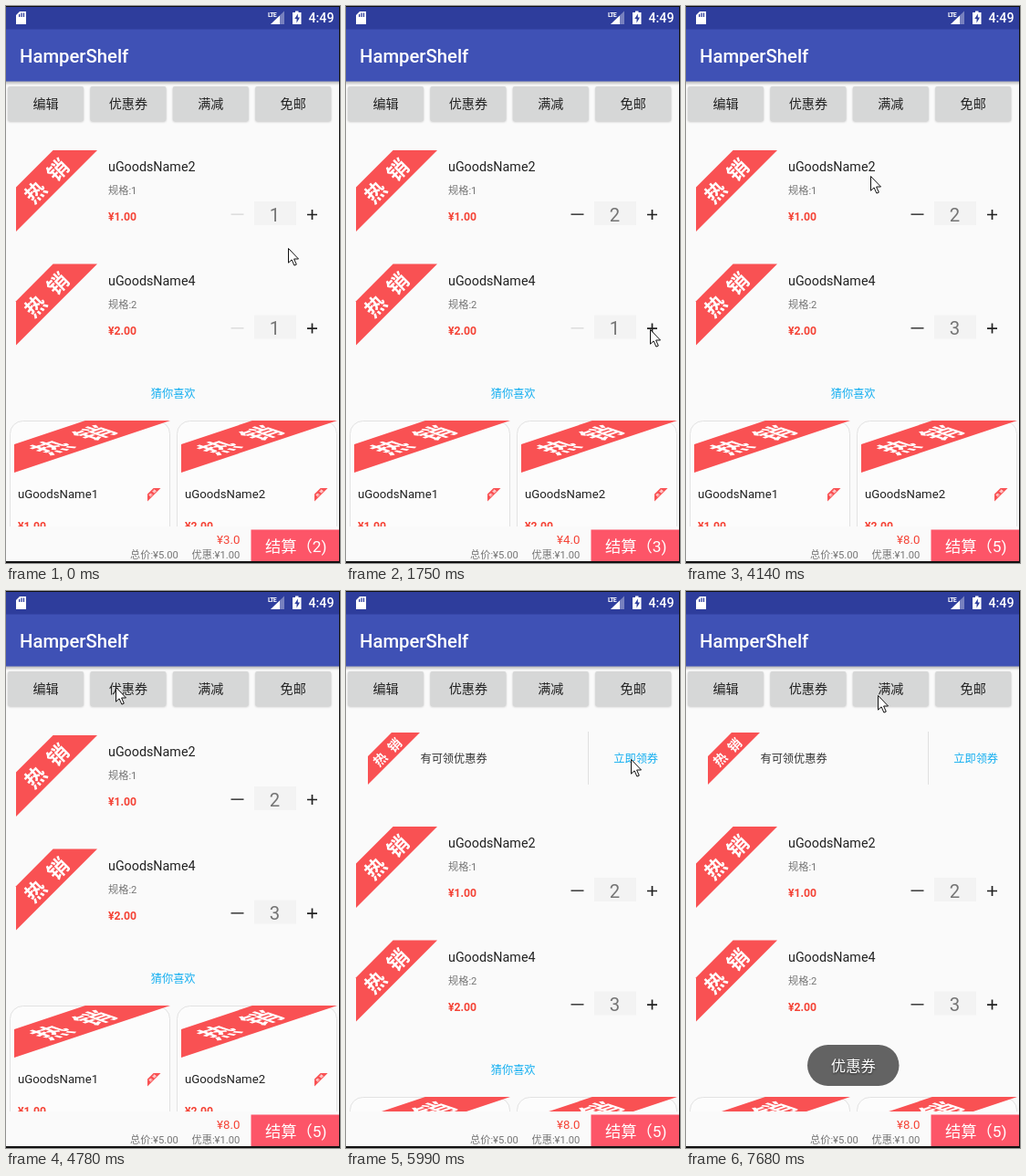
These frames come from a looping animation (366x610 px, 8000 ms). An HTML page:

```html
<!DOCTYPE html>
<html lang="zh-CN">
<head>
<meta charset="utf-8">
<style>
html, body { margin: 0; width: 100%; height: 100%; overflow: hidden; background: #fafafa; }
svg { display: block; }
text { font-family: Roboto, "Noto Sans CJK SC", "Noto Sans CJK", sans-serif; white-space: pre; }
.mid { text-anchor: middle; }
.end { text-anchor: end; }
.name { font-size: 14.3px; fill: #222; }
.small { font-size: 11.2px; fill: #757575; }
.price { font-size: 12.2px; font-weight: 700; fill: #f44336; }
.note { font-size: 12.2px; fill: #333; }
.link { font-size: 12.2px; fill: #13aef0; }
.qty { font-size: 20.3px; fill: #757575; }
</style>
</head>
<body>
<svg id="stage" width="366" height="610" viewBox="0 0 366 610"></svg>
<script>
const LOOP = 8000;
const STEP = 125; // screen refresh, ms
const COUPON_AT = 5200;

// Pointer moves: first step, last step, destination
const home = [309, 265];
const moves = [
  [150, 270, 329, 263],
  [420, 700, 334, 231],
  [1090, 1750, 333, 354],
  [4020, 4140, 202, 186],
  [4290, 4540, 63, 112],
  [4660, 4780, 120, 105],
  [5630, 5990, 312, 184],
  [6390, 6630, 304, 221],
  [6780, 7140, 169, 139],
  [7290, 7410, 145, 113],
  [7560, 7680, 210, 114]
];

// Eased progress that advances in equal visible steps
function progress(t, from, to) {
  if (t < from) return 0;
  const steps = Math.round((to - from) / STEP) + 1;
  const done = Math.floor((t - from) / (to - from) * (steps - 1)) + 1;
  return Math.sin(Math.min(1, done / steps) * Math.PI / 2);
}

function pointerAt(t) {
  let [x, y] = home;
  for (const [from, to, toX, toY] of moves) {
    const p = progress(t, from, to);
    x += (toX - x) * p;
    y += (toY - y) * p;
  }
  return `${x} ${y}`;
}

const text = (cls, x, y, str, extra = "") =>
  `<text class="${cls}" x="${x}" y="${y}" ${extra}>${str}</text>`;
const tag = (x, y, w, h = w) =>
  `<use href="#tag" transform="translate(${x} ${y}) scale(${w / 90} ${h / 90})"/>`;

const button = (label, i) => {
  const x = 2 + i * 90.4;
  return `<rect x="${x}" y="89" width="83" height="38" rx="2" fill="#000" opacity=".2" filter="url(#soft)"/>
    <rect id="button${i}" x="${x}" y="88" width="83" height="38" rx="2" fill="#d6d7d7"/>` +
    text("mid", x + 41.5, 112.3, label, 'font-size="14.1" fill="#222"');
};

const item = (y, n, spec, price, id) => `<g transform="translate(0 ${y})">
  ${tag(11, 0, 89)}
  ${text("name", 112, 23, "uGoodsName" + n)}
  ${text("small", 112, 48, "规格:" + spec)}
  ${text("price", 112, 77, price)}
  <path id="minus${id}" d="M246.5 70.2h14" stroke-width="1.6"/>
  <rect x="272" y="56" width="46" height="26" fill="#f3f3f3"/>
  ${text("qty mid", 294.5, 77.5, "1", `id="qty${id}"`)}
  <path d="M330 70.5h11M335.5 65v11" stroke="#222" stroke-width="1.7"/>
</g>`;

const card = (x, n) => `<g transform="translate(${x} 454)">
  <rect x="4.5" y=".5" width="175" height="170" rx="14" fill="#fcfcfc" stroke="#e2e2e2"/>
  ${tag(9, 0, 171, 57)}
  ${text("name", 13, 85, "uGoodsName" + n, 'style="font-size:13.2px"')}
  ${tag(155, 74, 14.5)}
  ${text("price", 13, 119.5, `¥${n}.00`)}
</g>`;

stage.innerHTML = `<defs>
  <filter id="soft" x="-10%" y="-20%" width="120%" height="140%"><feGaussianBlur stdDeviation="1"/></filter>
  <linearGradient id="shade" x2="0" y2="1">
    <stop stop-opacity=".3"/><stop offset="1" stop-opacity="0"/>
  </linearGradient>
  <g id="tag">
    <path d="M41 0H90L0 90V41z" fill="#f95153"/>
    <text class="mid" transform="translate(34 34) rotate(-45)" x="-17.5 17.5" y="8.5"
      font-size="23" font-weight="700" fill="#fff">热销</text>
  </g>
</defs>
<rect width="366" height="610" fill="#fafafa"/>
<g id="coupon">
  ${tag(24, 155, 57)}
  ${text("note", 81.5, 187.6, "有可领优惠券")}
  <path d="M265.5 154v58" stroke="#e0e0e0"/>
  ${text("link mid", 317.7, 187.6, "立即领券")}
</g>
<g id="list">
  ${item(158, 2, 1, "¥1.00", "A")}
  ${item(282.6, 4, 2, "¥2.00", "B")}
  ${text("link mid", 183.2, 428.7, "猜你喜欢")}
  ${card(0, 1)}${card(183, 2)}
</g>
<rect y="82" width="366" height="5" fill="url(#shade)"/>
${["编辑", "优惠券", "满减", "免邮"].map(button).join("")}

<rect y="25" width="366" height="57.5" fill="#3f51b5"/>
<rect width="366" height="25.5" fill="#2e3d9c"/>
${text("", 15, 62, "HamperShelf", 'font-size="20.3" font-weight="500" fill="#fff"')}
<g fill="#fff">
  <path d="M15 6h7v14H11V10zM14 9v3h1.3V9zm2.4-1.5V12h1.3V7.5zm2.4 0V12h1.3V7.5z" fill-rule="evenodd"/>
  ${text("", 287, 12, "LTE", 'font-size="7" font-weight="700" letter-spacing="-.8"')}
  <path d="M305 5.5V20H290z" opacity=".35"/>
  <path d="M300 10.5V20H290z"/>
  <path d="M317 5.5h3.5V7h3v13h-9.5V7h3z"/>
  <path d="M319.8 8.5l-3.5 5.5h2.2v4.5l3.5-6h-2.2z" fill="#2e3d9c"/>
  ${text("", 331.5, 18, "4:49", 'font-size="14.2" font-weight="500"')}
</g>

<rect y="570" width="366" height="40" fill="#fafafa"/>
${text("end", 256.3, 589, "", 'id="total" font-size="13.2" fill="#f44336"')}
${text("small", 136, 604.5, "总价:¥5.00")}
${text("small end", 256.3, 604.5, "优惠:¥1.00")}
<rect x="268.5" y="573.5" width="97.5" height="34.5" fill="#fd5568"/>
${text("", 284, 597.6, "", 'id="pay" font-size="17.3" fill="#fff"')}
<g id="toast">
  <rect x="133" y="497" width="100.5" height="45" rx="22.5" fill="#636363"/>
  ${text("mid", 183.3, 525.5, "优惠券", 'font-size="16.3" fill="#fff" style="text-shadow:0 1px 2px #0009"')}
</g>
<path d="M0 .5H366M365.5 0V610" stroke="#111"/>
<path d="M0 609H366" stroke="#111" stroke-width="2"/>
<path id="pointer" d="M.5 .5v15.7l3.6-3.3 2.8 6.2 2.4-1-2.7-6.1h4.9z" fill="#fff" stroke="#111"/>`;

const $ = id => document.getElementById(id);

function setQty(id, n) {
  $("qty" + id).textContent = n;
  $("minus" + id).setAttribute("stroke", n > 1 ? "#444" : "#dedede");
}

function draw(t) {
  const a = t < 1240 ? 1 : 2;
  const b = t < 2310 ? 1 : t < 3280 ? 2 : 3;
  setQty("A", a);
  setQty("B", b);
  $("total").textContent = `¥${a + 2 * b}.0`;
  $("pay").textContent = `结算（${a + b})`;

  const open = t >= COUPON_AT;
  const pressed = open && t < COUPON_AT + STEP;
  $("coupon").setAttribute("opacity", open ? 1 : 0);
  $("list").setAttribute("transform", `translate(0 ${open ? 100 : 0})`);
  $("button1").setAttribute("fill", pressed ? "#cccdcd" : "#d6d7d7");
  $("toast").setAttribute("opacity", progress(t, 6510, 6780));
  $("pointer").setAttribute("transform", `translate(${pointerAt(t)})`);
}

const start = performance.now();
function tick() {
  draw((performance.now() - start) % LOOP);
  requestAnimationFrame(tick);
}
tick();
</script>
</body>
</html>
```
